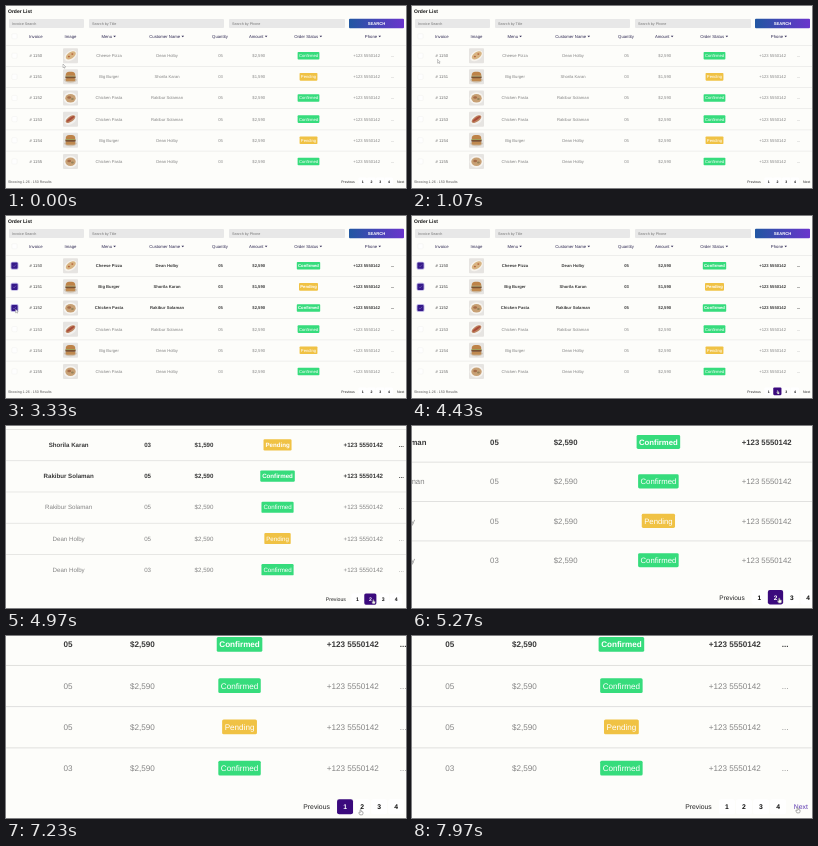
Animation, 400 px wide and 182 px high, one loop 8000 ms. Source, as an HTML page with a canvas:

```html
<!DOCTYPE html>
<html lang="en">
<head>
<meta charset="utf-8">
<title>Order List</title>
<style>
  html, body { margin: 0; width: 100%; height: 100%; overflow: hidden; background: #fdfdfa; }
  canvas { display: block; width: 400px; height: 182px; }
</style>
</head>
<body>
<canvas id="stage"></canvas>
<script>
const W = 400, H = 182, LOOP = 8000;
const PURPLE = '#3b0a7d', GREY = '#858585', DARK = '#3a3a3a', HEAD = '#2c2650';
const canvas = document.getElementById('stage');
const ctx = canvas.getContext('2d');
const dpr = window.devicePixelRatio || 1;
canvas.width = W * dpr;
canvas.height = H * dpr;

const COL = { check: 8.5, invoice: 29.8, image: 64.5, menu: 103, name: 161, qty: 214.5,
              amount: 252.7, status: 302.5, phone: 360.6, more: 386.4 };
const HEADER_Y = 30.3, ROW_TOP = 39.3, ROW_H = 21.15;

const headers = [
  ['Invoice', COL.invoice], ['Image', COL.image], ['Menu', 102.5, true],
  ['Customer Name', 160.5, true], ['Quantity', 214, false], ['Amount', 252, true],
  ['Order Status', 302, true], ['Phone', 366.8, true]
];
// menu, customer, quantity, amount, status, dish, time the row gets ticked
const rows = [
  ['Cheese Pizza', 'Dean Holby', '05', '$2,590', 'Confirmed', 'pizza', 1800],
  ['Big Burger', 'Shorila Karan', '03', '$1,590', 'Pending', 'burger', 2700],
  ['Chicken Pasta', 'Rakibur Solaman', '05', '$2,590', 'Confirmed', 'pasta', 3250],
  ['Chicken Pasta', 'Rakibur Solaman', '05', '$2,590', 'Confirmed', 'roll', Infinity],
  ['Big Burger', 'Dean Holby', '05', '$2,590', 'Pending', 'burger', Infinity],
  ['Chicken Pasta', 'Dean Holby', '03', '$2,590', 'Confirmed', 'pasta', Infinity]
];
// time, x, y in page units
const cursorPath = [
  [0, 57, 58], [400, 57, 58], [1500, 9.5, 51], [1950, 9.5, 51], [2270, 9.5, 67.5], [2600, 9.5, 72],
  [2800, 9.5, 72], [3150, 9.5, 93], [3500, 9.5, 93], [4350, 366, 175.5], [4800, 367.5, 176],
  [5450, 367.5, 176], [5720, 374, 176.5], [6000, 372.1, 176.5], [6600, 356.5, 176.8],
  [7080, 356.5, 176.8], [7230, 364.7, 177], [7550, 393, 176]
];
// time from which a pager entry is highlighted
const hovers = [[0, ''], [4360, '2'], [5640, '3'], [6200, '2'], [6480, '1'], [7260, ''], [7470, 'Next']];

const smooth = (t, a, b) => {
  const u = Math.min(1, Math.max(0, (t - a) / (b - a)));
  return u * u * (3 - 2 * u);
};

function cursorAt(t) {
  const i = cursorPath.findIndex(p => p[0] > t);
  if (i < 0) return cursorPath[cursorPath.length - 1].slice(1);
  const [ta, xa, ya] = cursorPath[i - 1], [tb, xb, yb] = cursorPath[i];
  const u = smooth(t, ta, tb);
  return [xa + (xb - xa) * u, ya + (yb - ya) * u];
}

function text(str, x, y, { size = 4.18, color = GREY, bold = false, align = 'center' } = {}) {
  ctx.font = `${bold ? 'bold ' : ''}${size}px "Liberation Sans", Arial, sans-serif`;
  ctx.textAlign = align;
  ctx.fillStyle = color;
  ctx.fillText(str, x, y + size * 0.36);
  return ctx.measureText(str).width;
}

function box(x, y, w, h, r, fill, stroke) {
  ctx.beginPath();
  ctx.roundRect(x, y, w, h, r);
  if (fill) { ctx.fillStyle = fill; ctx.fill(); }
  if (stroke) { ctx.strokeStyle = stroke; ctx.lineWidth = 0.4; ctx.stroke(); }
}

function oval(x, y, rx, ry, fill, angle = 0) {
  ctx.beginPath();
  ctx.ellipse(x, y, rx, ry, angle, 0, 7);
  ctx.fillStyle = fill;
  ctx.fill();
}

function polygon(points, fill, stroke) {
  ctx.beginPath();
  points.forEach(([x, y]) => ctx.lineTo(x, y));
  ctx.closePath();
  ctx.fillStyle = fill;
  ctx.fill();
  if (stroke) { ctx.strokeStyle = stroke; ctx.lineWidth = 0.35; ctx.stroke(); }
}

function dish(kind, x, y) {
  box(x - 7.5, y - 7.5, 15, 15, 1, '#e6e4e1');
  if (kind === 'burger') {
    oval(x, y + 3.2, 6.3, 2.8, '#cfc3b3');
    box(x - 4.8, y + 1.2, 9.6, 3.2, 1.5, '#c08a50');
    box(x - 5.2, y - 0.5, 10.4, 2, 0.8, '#7a5030');
    box(x - 5.2, y - 1.3, 10.4, 1, 0.5, '#a3a05c');
    box(x - 4.8, y - 5.2, 9.6, 4, [3.6, 3.6, 0.5, 0.5], '#bd8348');
  } else if (kind === 'pizza') {
    oval(x, y, 7, 4.6, '#f7f4ee', -0.6);
    oval(x + 0.3, y - 0.3, 5.6, 3.3, '#d8b482', -0.6);
    oval(x - 1.6, y + 0.9, 1.1, 0.8, '#b8683f');
    oval(x + 1.8, y - 1.6, 1.1, 0.8, '#b8683f');
  } else if (kind === 'pasta') {
    oval(x, y + 0.3, 6.9, 6, '#f6f4f0');
    oval(x, y + 0.3, 5.2, 4.2, '#c7a074');
    oval(x - 1.3, y - 0.5, 1.9, 1.3, '#a56c48');
    oval(x + 1.9, y + 1, 1.4, 1, '#97825a');
  } else {
    oval(x, y + 0.4, 6.8, 4.6, '#f3f1ee', -0.6);
    oval(x, y, 5.6, 2.7, '#bd8460', -0.6);
    oval(x, y - 0.2, 4.6, 1.1, '#a94a38', -0.6);
  }
}

function checkbox(y, checked) {
  const x = COL.check;
  if (!checked) return box(x - 2.6, y - 2.6, 5.2, 5.2, 1, '#fefefe', '#ececea');
  box(x - 4, y - 4, 8, 8, 2, '#bdb5e4');
  box(x - 3.1, y - 3.1, 6.2, 6.2, 1, '#35198a');
  ctx.beginPath();
  ctx.moveTo(x - 1.4, y);
  ctx.lineTo(x - 0.4, y + 1.1);
  ctx.lineTo(x + 1.6, y - 1.2);
  ctx.strokeStyle = '#8f80cc';
  ctx.lineWidth = 0.45;
  ctx.stroke();
}

function drawTop() {
  text('Order List', 2, 5, { size: 5, color: '#111', bold: true, align: 'left' });
  [['Invoice Search', 3, 75], ['Search by Title', 83, 135], ['Search by Phone', 223, 116]].forEach(([label, x, w]) => {
    box(x, 13, w, 9, 1, '#e8e8e8');
    text(label, x + 3, 17.6, { size: 3.7, color: '#777', align: 'left' });
  });
  const blend = ctx.createLinearGradient(343, 0, 398, 0);
  blend.addColorStop(0, '#2257a2');
  blend.addColorStop(1, '#6a35cc');
  box(343, 12.8, 55, 9.4, 1, blend);
  text('SEARCH', 370.5, 17.5, { size: 4.2, color: '#fff', bold: true });

  headers.forEach(([label, x, sortable]) => {
    const w = text(label, x - (sortable ? 1.8 : 0), HEADER_Y, { size: 4.25, color: HEAD });
    if (sortable) {
      const cx = x + w / 2 + 0.8;
      polygon([[cx - 1.3, HEADER_Y - 0.5], [cx + 1.3, HEADER_Y - 0.5], [cx, HEADER_Y + 1]], HEAD);
    }
  });
  checkbox(HEADER_Y, false);
}

function drawRow([menu, name, qty, amount, status, kind, tickTime], i, t) {
  const top = ROW_TOP + i * ROW_H, y = top + ROW_H / 2 - 0.2;
  const bold = t >= tickTime;
  const style = { bold, color: bold ? DARK : GREY };
  ctx.fillStyle = '#dcdcda';
  ctx.fillRect(0, top - 0.2, W, 0.45);
  checkbox(y, bold);
  dish(kind, COL.image, y);
  text('# ' + (1150 + i), COL.invoice, y, { color: bold ? DARK : '#6f6f6f' });
  text(menu, COL.menu, y, style);
  text(name, COL.name, y, style);
  text(qty, COL.qty, y, style);
  text(amount, COL.amount, y, style);
  text('+123 5550142', COL.phone, y, style);
  text('...', COL.more, y, style);
  ctx.font = `${bold ? 'bold ' : ''}4.18px "Liberation Sans", Arial, sans-serif`;
  const w = ctx.measureText(status).width + 2.6;
  box(COL.status - w / 2, y - 3.8, w, 7.6, 0.8, status === 'Pending' ? '#f0c244' : '#36dc7c');
  text(status, COL.status, y, { bold, color: '#fff' });
}

function drawFooter(hover) {
  const y = 175.3;
  text('Showing 1-26 - 150 Results', 2, y, { size: 3.55, color: '#555', align: 'left' });
  text('Previous', 342, y, { size: 3.5, color: '#222' });
  ['1', '2', '3', '4'].forEach((page, i) => {
    const x = 356.6 + i * 8.75, on = hover === page;
    box(x - 4.1, y - 3.85, 8.2, 7.7, 1.1, on ? PURPLE : '#fff');
    text(page, x, y, { size: 3.5, bold: true, color: on ? '#fff' : '#111' });
  });
  text('Next', 394.5, y, { size: 3.5, color: hover === 'Next' ? '#5a35b0' : '#222' });
}

function drawCursor(x, y) {
  if (y < 160) {
    const arrow = [[0, 0], [0, 3.8], [0.9, 3], [1.5, 4.3], [2.1, 4], [1.5, 2.8], [2.7, 2.7]];
    polygon(arrow.map(([dx, dy]) => [x + dx, y + dy]), '#fff', '#666');
  } else {
    const hand = [[-0.4, -0.2], [0.1, -0.2], [0.2, 0.7], [1.1, 0.9], [1.1, 1.9], [0.8, 2.4], [-0.5, 2.4], [-1.1, 1.3], [-0.8, 1], [-0.4, 1.4]];
    polygon(hand.map(([dx, dy]) => [x + dx, y + dy]), '#fff', '#888');
  }
}

function draw(t) {
  const scale = 1 + 0.95 * smooth(t, 4490, 5450);
  const focusX = 367.5 + 33 * smooth(t, 6920, 7920), focusY = 180;
  const hover = hovers.filter(h => h[0] <= t).pop()[1];

  ctx.setTransform(dpr, 0, 0, dpr, 0, 0);
  ctx.fillStyle = '#fdfdfa';
  ctx.fillRect(0, 0, W, H);
  ctx.translate(focusX * (1 - scale), focusY * (1 - scale));
  ctx.scale(scale, scale);
  ctx.textRendering = 'geometricPrecision';
  ctx.lineJoin = 'round';

  drawTop();
  rows.forEach((row, i) => drawRow(row, i, t));
  drawFooter(hover);
  drawCursor(...cursorAt(t));
}

const start = performance.now();
function tick() {
  draw((performance.now() - start) % LOOP);
  requestAnimationFrame(tick);
}
tick();
</script>
</body>
</html>
```
